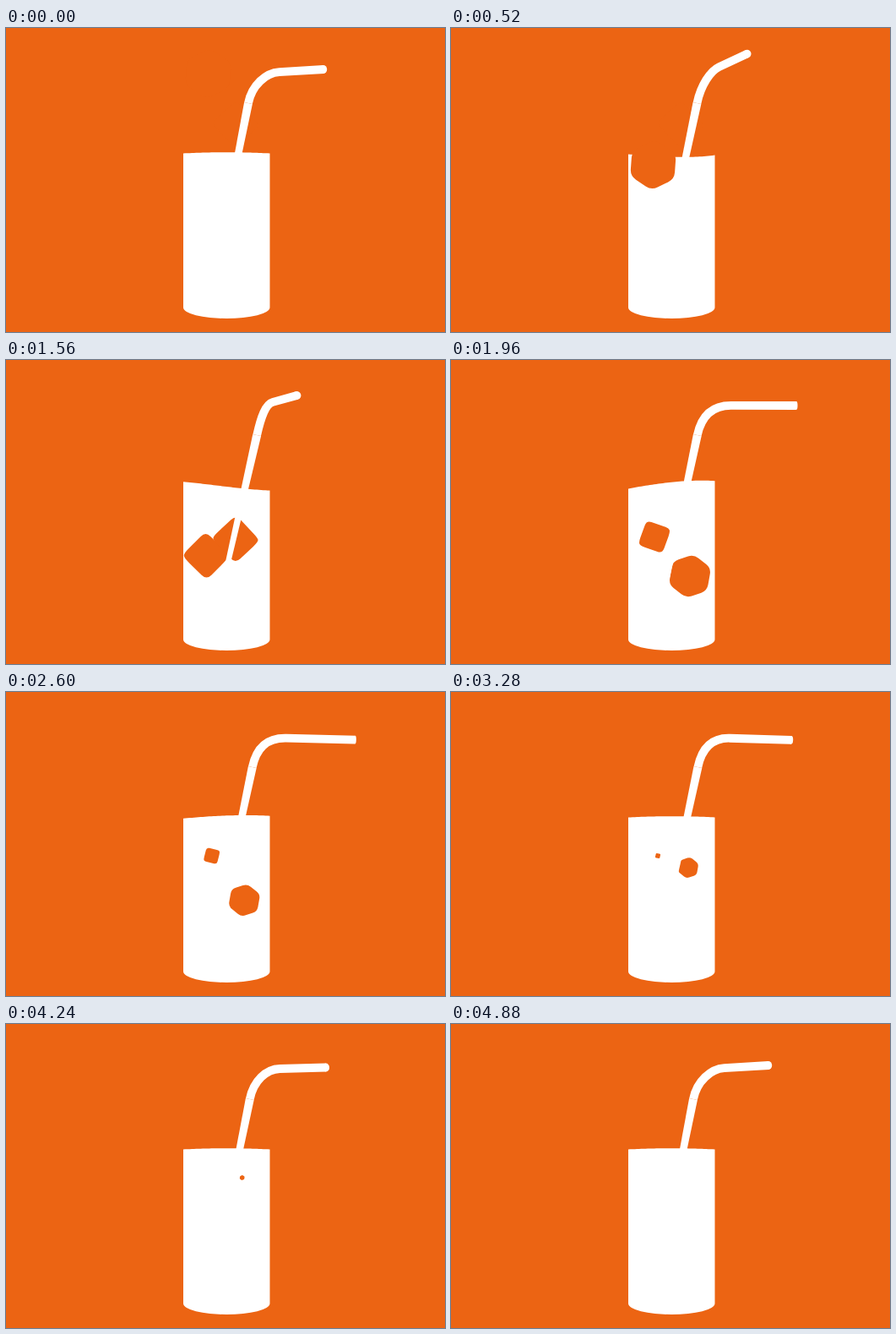
An HTML page that plays this animation: 520x360 px, repeating every 4960 ms.

```html
<!DOCTYPE html>
<html lang="en">
<head>
<meta charset="utf-8">
<title>Iced drink</title>
<style>
  html, body { margin: 0; width: 100%; height: 100%; overflow: hidden; background: #ec6413; }
  svg { display: block; width: 100%; height: 100%; }
</style>
</head>
<body>
<svg viewBox="0 0 520 360">
  <path id="glass" fill="#fff"/>
  <path id="iceA" fill="#ec6413"/>
  <path id="iceB" fill="#ec6413"/>
  <path id="stem" fill="#fff"/>
  <path id="bend" fill="none" stroke="#fff" stroke-width="9.8"/>
  <ellipse id="tip" fill="#fff" ry="4.9"/>
</svg>
<script>
const LOOP = 4960, STEP = 40, LAST = 4880;
const GLASS = { mid: 261.25, half: 51.25, top: 147.2, base: 331 };

const el = id => document.getElementById(id);
const clamp = v => Math.max(0, Math.min(1, v));
const part = (t, a, b) => clamp((t - a) / (b - a));
const smooth = u => u * u * (3 - 2 * u);
const xy = (x, y) => x.toFixed(2) + " " + y.toFixed(2) + " ";

// Straw: time, x at the rim, tip x, tip y
const rest = [275.5, 376, 49];
const swing = [
  [0, ...rest],
  [500, 279, 352, 30.5],
  [840, 284.7, 324, 37.3],
  [1400, 285, 325, 38],
  [1560, 284, 344.5, 42],
  [1960, 279.5, 409, 54],
  [2560, 279.5, 413.5, 56.5],
  [3280, 280, 403, 56.8],
  [4240, 277, 379, 51.5],
  [LAST, ...rest]
];

// Turns: time, x, yaw, pitch, roll in degrees
const ice = [
  {
    id: "iceA", edge: 37, fall: [320, 880], from: 54, depth: 238,
    rise: [1300, 2400], float: 194, melt: [1560, 3960], power: 1.6,
    turns: [[840, 239.5, 45, 35, 4], [1560, 237, 7, 5, 45], [1960, 241, 7, 7, 20], [3280, 245, 7, 5, 12]]
  },
  {
    id: "iceB", edge: 37.5, fall: [1240, 1960], from: 114, depth: 256,
    rise: [2200, 4000], float: 182, melt: [1560, 4550], power: 1,
    turns: [[1560, 272, 6, 4, 47], [1960, 283, 45, 33, 10], [3280, 281, 45, 33, 10], [4240, 279.7, 45, 33, 10]]
  }
];

const splashes = [
  { at: 480, tilt: 3, dip: 23, period: 1440, life: 1000 },
  { at: 1480, tilt: 8, dip: 3, period: 640, life: 2000 }
];

// Smooth interpolation without overshoot
function at(keys, t) {
  const n = keys.length - 1;
  if (t <= keys[0][0]) return keys[0].slice(1);
  if (t >= keys[n][0]) return keys[n].slice(1);
  let i = 0;
  while (keys[i + 1][0] <= t) i++;
  const h = keys[i + 1][0] - keys[i][0], u = (t - keys[i][0]) / h;
  const rate = (k, c) => (keys[k + 1][c] - keys[k][c]) / (keys[k + 1][0] - keys[k][0]);
  const slope = (k, c) => {
    if (k === 0 || k === n) return 0;
    const a = rate(k - 1, c), b = rate(k, c);
    return a * b > 0 ? 2 * a * b / (a + b) : 0;
  };
  return keys[i].slice(1).map((p, j) => {
    const c = j + 1, v = 1 - u;
    return p + (keys[i + 1][c] - p) * smooth(u)
      + h * u * v * (slope(i, c) * v - slope(i + 1, c) * u);
  });
}

// Liquid height for u from -1 (left wall) to 1 (right wall)
function surface(u, t) {
  let y = GLASS.top + 1.3 * u * u;
  for (const s of splashes) {
    const dt = t - s.at;
    if (dt < 0 || dt > s.life) continue;
    const wave = (1 - dt / s.life) ** 2 * Math.sin(2 * Math.PI * dt / s.period);
    y += wave * (s.tilt * u + s.dip * (0.43 + (1 - u * u) * (1 + 0.4 * u)));
  }
  return y;
}

function drawGlass(t) {
  const { mid, half, base } = GLASS, n = 40;
  let d = "";
  for (let i = 0; i <= n; i++) {
    const u = 2 * i / n - 1;
    d += (i ? "L" : "M") + xy(mid + half * u, surface(u, t));
  }
  el("glass").setAttribute("d", `${d}V${base}A${half} 13 0 0 1 ${mid - half} ${base}Z`);
}

// Corners of a turned unit cube, seen from the front
function cube(yaw, pitch, roll) {
  const turn = (a, b, deg) => {
    const r = deg * Math.PI / 180, c = Math.cos(r), s = Math.sin(r);
    return [a * c - b * s, a * s + b * c];
  };
  const pts = [];
  for (let i = 0; i < 8; i++) {
    let [x, y, z] = [1, 2, 4].map(bit => i & bit ? 0.5 : -0.5);
    [x, z] = turn(x, z, yaw);
    [y, z] = turn(y, z, pitch);
    pts.push(turn(x, y, roll));
  }
  return pts;
}

function hull(pts) {
  const sorted = [...pts].sort((a, b) => a[0] - b[0] || a[1] - b[1]);
  const chain = list => {
    const out = [];
    for (const p of list) {
      while (out.length > 1) {
        const [a, b] = out.slice(-2);
        if ((b[0] - a[0]) * (p[1] - a[1]) - (b[1] - a[1]) * (p[0] - a[0]) > 0) break;
        out.pop();
      }
      out.push(p);
    }
    return out.slice(0, -1);
  };
  return [...chain(sorted), ...chain(sorted.reverse())];
}

function rounded(pts, r) {
  const toward = (a, b) => {
    const dx = b[0] - a[0], dy = b[1] - a[1], d = Math.hypot(dx, dy) || 1;
    const k = Math.min(r, d * 0.48) / d;
    return xy(a[0] + dx * k, a[1] + dy * k);
  };
  const n = pts.length;
  return pts.map((p, i) =>
    (i ? "L" : "M") + toward(p, pts[(i + n - 1) % n]) +
    "Q" + xy(...p) + toward(p, pts[(i + 1) % n])).join("") + "Z";
}

function drawIce(c, t) {
  const [x, yaw, pitch, roll] = at(c.turns, t);
  const sink = (1 - part(t, ...c.fall)) ** 2, lift = smooth(part(t, ...c.rise));
  const y = c.depth + (c.from - c.depth) * sink + (c.float - c.depth) * lift;
  const size = c.edge * (1 - part(t, ...c.melt)) ** c.power;
  const pts = hull(cube(yaw, pitch, roll)).map(p => [x + p[0] * size, y + p[1] * size]);
  el(c.id).setAttribute("d", size > 0.1 ? rounded(pts, size * 0.22) : "");
}

function drawStraw(t) {
  const [rim, tx, ty] = at(swing, t);
  const reach = clamp((tx - 324) / 86);
  const ex = 287 + 1.2 * (rim - rest[0]), ey = 89;
  const kx = 311 + 21 * reach, ky = 36 + 0.33 * ty;
  const dx = ex - rim, dy = ey - GLASS.top;

  // The stem narrows towards the bottom
  const bx = ex + (300 - ey) * dx / dy;
  el("stem").setAttribute("d", "M" + xy(ex - 4.9, ey - 1) + "L" + xy(ex + 4.9, ey + 1) +
    "L" + xy(bx + 2.4, 300) + "L" + xy(bx - 2.4, 300) + "Z");
  el("bend").setAttribute("d", "M" + xy(ex, ey) +
    "C" + xy(ex + dx * 0.37, ey + dy * 0.37) +
    xy(kx - (tx - kx) * 0.3, ky - (ty - ky) * 0.3) + xy(kx, ky) + "L" + xy(tx, ty));

  const angle = Math.atan2(ty - ky, tx - kx) * 180 / Math.PI;
  el("tip").setAttribute("rx", 5 - 3.6 * reach ** 3);
  el("tip").setAttribute("transform", `translate(${xy(tx, ty)}) rotate(${angle.toFixed(2)})`);
}

function draw(t) {
  drawGlass(t);
  ice.forEach(c => drawIce(c, t));
  drawStraw(t);
}

const start = performance.now();
function tick() {
  const t = (performance.now() - start) % LOOP;
  draw(Math.min(Math.floor(t / STEP) * STEP, LAST));
  requestAnimationFrame(tick);
}
tick();
</script>
</body>
</html>
```
